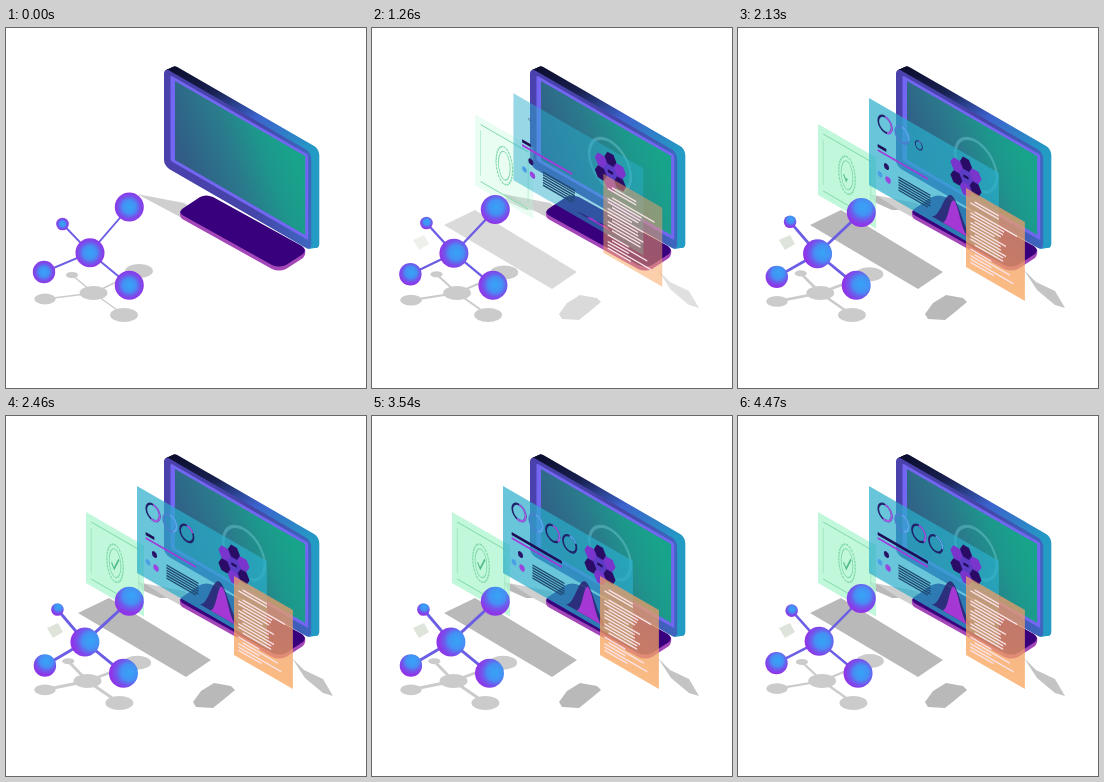
Recreate the animation shown at these times as an HTML page. Size 360x360 px, loop 4500 ms.

```html
<!DOCTYPE html>
<html lang="en">
<head>
<meta charset="utf-8">
<title>Isometric dashboard</title>
<style>
html, body { margin: 0; width: 100%; height: 100%; overflow: hidden; background: #fff; }
svg { display: block; width: 100vw; height: 100vh; }
</style>
</head>
<body>
<svg viewBox="0 0 360 360">
  <defs>
    <linearGradient id="body" x1="0" x2="1">
      <stop offset="0" stop-color="#0b0c2c"/><stop offset=".3" stop-color="#18204e"/>
      <stop offset=".6" stop-color="#3c62cc"/><stop offset="1" stop-color="#239cc4"/>
    </linearGradient>
    <linearGradient id="bezel" x1="0" x2="1">
      <stop offset="0" stop-color="#4b41ad"/><stop offset=".6" stop-color="#4544a8"/>
      <stop offset="1" stop-color="#3d67c0"/>
    </linearGradient>
    <linearGradient id="screen" x1="0" y1=".7" x2="1" y2=".4">
      <stop offset="0" stop-color="#315d86"/><stop offset=".45" stop-color="#2a7a8c"/>
      <stop offset=".75" stop-color="#1d978c"/><stop offset="1" stop-color="#18a38b"/>
    </linearGradient>
    <linearGradient id="paper" x1="0" y1="0" x2="0" y2="1">
      <stop offset="0" stop-color="#ea9c68"/><stop offset="1" stop-color="#f9a55c"/>
    </linearGradient>
    <radialGradient id="tone">
      <stop offset="0" stop-color="#36a4f6"/><stop offset=".45" stop-color="#4490f4"/>
      <stop offset=".72" stop-color="#7058ec"/><stop offset="1" stop-color="#8f35e8"/>
    </radialGradient>
    <radialGradient id="top" href="#tone"/>
    <radialGradient id="side" href="#tone"/>
  </defs>

  <path d="M131 166L178 175 276 242 262 237 176 190Z" fill="#cfcfcf"/>
  <g id="shades" fill="#b9b9b9">
    <path d="M72 197L103 182 205 244 180 261Z"/>
    <path d="M132 166L141 169 161 182 154 182 136 174Z"/>
    <path d="M187 286L195 275 208 267 225 270 229 274 217 284 207 292 190 291Z"/>
    <path d="M286 242L298 254 317 263 327 280 317 277 299 262Z" fill="#c4c4c4"/>
    <path d="M41 212L52 207 57 216 47 222Z" fill="#dfe4da"/>
  </g>

  <path d="M174 183Q173 190 178 192L266 241Q273 244 280 241L297 230Q300 227 299 221Z" fill="#a346b8"/>
  <path d="M176 181L194 169Q200 166 207 169L296 218Q301 222 297 226L280 237Q273 240 266 237L178 188Q172 185 176 181Z" fill="#38007c"/>
  <g id="shell"></g>
  <g transform="matrix(.866 .5 0 1 158 39.5)">
    <rect width="170" height="98.5" rx="6" fill="url(#bezel)"/>
    <rect x="7.5" y="4" width="159" height="85.5" rx="2" fill="#7366f2"/>
    <rect x="12.7" y="7.1" width="150.3" height="79" fill="url(#screen)"/>
    <circle id="ring" cx="92.4" cy="51.5" r="24" fill="none" stroke="#79cfdc" stroke-width="3"
      stroke-opacity=".4" pathLength="100" transform="rotate(-75 92.4 51.5)"/>
  </g>

  <g id="cert">
    <rect class="sheet" width="67" height="71" fill="#b2f6d1" fill-opacity=".8"/>
    <g class="ink" fill="none" stroke="#7fd9aa" stroke-width="1">
      <path d="M6 7H61M6 64H61"/>
      <path d="M6 13V58M61 13V58" stroke-opacity=".5"/>
      <ellipse cx="33.5" cy="34.5" rx="9.5" ry="18.5" stroke-width="1.4" stroke-dasharray="2.5 .8"/>
      <ellipse cx="33.5" cy="34.5" rx="6.8" ry="14"/>
      <path id="tick" d="M29.5 35.5L32.5 40.5 38 28.5" stroke="#55bd8d" stroke-width="1.6" pathLength="100"/>
    </g>
  </g>
  <g id="dash">
    <rect class="sheet" width="150" height="87" fill="#2aaecb" fill-opacity=".7"/>
    <g class="ink">
      <g id="rings"></g>
      <path id="bar" stroke="#1d0d55" stroke-width="3" fill="none"/>
      <path d="M10 47H68" stroke="#a03cdc" stroke-width="2.2"/>
      <circle cx="20.2" cy="58.4" r="3" fill="#2a1266"/>
      <circle cx="22" cy="71" r="3.2" fill="#9a45e0"/>
      <circle cx="12.7" cy="70" r="2.8" fill="#4a9fe6"/>
      <path d="M34 62H71M34 64.6H71M34 67.2H71M34 69.8H71M34 72.4H71M34 75H68" stroke="#1f4b72" stroke-width="1.6"/>
      <path id="hill" fill="#2b2372"/>
      <path id="peak" fill="#a538d4"/>
      <g id="cells"></g>
    </g>
  </g>
  <g id="note">
    <rect class="sheet" width="68" height="79" fill="url(#paper)" fill-opacity=".76"/>
    <g class="ink" id="rows" stroke="#fbe4ea" stroke-width="1.5"></g>
  </g>

  <g id="under" fill="#cbcbcb" stroke="#cbcbcb"></g>
  <g id="mol"></g>
</svg>
<script>
const LOOP = 4500;
const $ = id => document.getElementById(id);
const add = (parent, tag, attrs) => {
  const el = document.createElementNS("http://www.w3.org/2000/svg", tag);
  set(el, attrs);
  parent.appendChild(el);
  return el;
};
const set = (el, attrs) => { for (const k in attrs) el.setAttribute(k, attrs[k]); };
const span = (t, a, b) => Math.min(1, Math.max(0, (t - a) / (b - a)));
const ease = x => x * x * (3 - 2 * x);
const mix = (a, b, k) => a + (b - a) * k;

// Monitor depth
for (let i = 9; i > 0; i--) {
  add($("shell"), "rect", { width: 170, height: 98.5 + i * .3, rx: 6, fill: "url(#body)",
    transform: `matrix(.866 .5 0 1 ${158 + i * .9} ${39.5 - i * .4})` });
}

// Small gauges along the top of the dashboard
const gauges = [[0, 1150], [1, 1350], [2, 1900], [3, 2800]].map(([i, start]) => {
  const g = add($("rings"), "g", {});
  const base = { r: 7.8, fill: "none", "stroke-width": 2, pathLength: 100 };
  add(g, "circle", { ...base, stroke: i === 1 ? "#4a7fd0" : "#20216a" });
  const arc = add(g, "circle", { ...base, stroke: i % 2 ? "#58a8ec" : "#a05ae4", transform: "rotate(-90)" });
  return { g, arc, start, x: 18.5 + i * 19.5, y: 17.2 + i * .7, part: 55 - i * 9 };
});

// Honeycomb
const hexagon = (x, y, r) => "M" + [0, 1, 2, 3, 4, 5].map(i => {
  const a = i * Math.PI / 3;
  return (x + r * Math.cos(a)).toFixed(2) + " " + (y + r * Math.sin(a)).toFixed(2);
}).join("L") + "Z";
const hive = { x: 112, y: 23 };
add($("cells"), "circle", { cx: hive.x, cy: hive.y, r: 14, fill: "#5a3cc4" });
add($("cells"), "path", { d: `M${hive.x - 3} ${hive.y}h6`, stroke: "#200c58", "stroke-width": 2.6 });
for (let i = 0; i < 6; i++) {
  const a = (i + .5) * Math.PI / 3;
  add($("cells"), "path", {
    d: hexagon(hive.x + 12.8 * Math.cos(a), hive.y + 12.8 * Math.sin(a), 6.9),
    fill: i % 2 ? "#7a35cc" : "#2a0b66"
  });
}

// Lines of the note
let seed = 11;
const rand = () => (seed = seed * 16807 % 2147483647) / 2147483647;
const lines = [];
for (let i = 0; i < 20; i++) {
  if (i === 2 || i === 14) continue;
  const x = rand() < .3 ? 10 : 5;
  const len = i === 0 ? 28 : 24 + rand() * 29;
  lines.push(`M${x} ${(9 + i * 3.3).toFixed(1)}h${len.toFixed(1)}`);
}
add($("rows"), "path", { d: lines.join("") });

const sheets = [
  { id: "dash", x: 131, y: 70, dx: 28, dy: -13, a: 500, b: 1800 },
  { id: "cert", x: 80, y: 96, dx: 34, dy: -14, a: 850, b: 1950 },
  { id: "note", x: 228, y: 160, dx: 9, dy: -38, a: 500, b: 1800 }
].map(s => ({ ...s, el: $(s.id), fill: $(s.id).querySelector(".sheet"), ink: $(s.id).querySelector(".ink") }));

// Molecule: rest place, swung place, radius, shadow places, lit edge
const atoms = [
  { p: [84, 224.7], q: [78.5, 226], r: 14.5, s: [87.5, 265], e: [81, 265], lit: "side" },
  { p: [123.3, 179], q: [123.3, 185.8], r: 14.5, s: [133, 243], e: [131, 247], lit: "top" },
  { p: [56.5, 196], q: [51, 193.3], r: 6.3, s: [66, 247], e: [62, 245], lit: "top" },
  { p: [38, 244], q: [39, 250], r: 11.2, s: [39, 271], e: [39, 274], lit: "top" },
  { p: [123.3, 257.3], q: [117, 257.3], r: 14.5, s: [118, 287], e: [113, 287], lit: "side" }
];
atoms.forEach((a, i) => {
  if (!i) return;
  a.dark = add($("under"), "line", {});
  a.link = add($("mol"), "line", { stroke: "#6b5de4" });
});
atoms.forEach(a => {
  a.shade = add($("under"), "ellipse", { rx: a.r * .96, ry: a.r * .48, stroke: "none" });
  a.ball = add($("mol"), "circle", { r: a.r, fill: `url(#${a.lit})` });
});

function join(el, [x1, y1], [x2, y2], w) {
  set(el, { x1, y1, x2, y2, "stroke-width": w });
}

function draw(t) {
  const swing = (1 - Math.cos(t * Math.PI / 3000)) / 2;
  const at = (a, b) => a.map((v, i) => mix(v, b[i], swing));
  const hub = at(atoms[0].p, atoms[0].q), hubShade = at(atoms[0].s, atoms[0].e);
  atoms.forEach(a => {
    const c = at(a.p, a.q), s = at(a.s, a.e);
    set(a.ball, { cx: c[0], cy: c[1] });
    set(a.shade, { cx: s[0], cy: s[1] });
    if (a.link) {
      join(a.link, hub, c, mix(1.9, 3, swing));
      join(a.dark, hubShade, s, mix(1.5, 3, swing));
    }
  });
  const r = mix(.5, .64, swing);
  set($("top"), { cx: .5 + .08 * swing, cy: .5 - .22 * swing, r });
  set($("side"), { cx: .5 + .22 * swing, cy: .5 - .04 * swing, r });

  sheets.forEach(s => {
    const k = ease(span(t, s.a, s.b));
    set(s.el, { transform: `matrix(.866 .5 0 1 ${s.x + s.dx * (1 - k)} ${s.y + s.dy * (1 - k)})` });
    set(s.fill, { opacity: Math.min(1, k * 1.1) });
    set(s.ink, { opacity: Math.min(1, k * 4) });
  });
  set($("shades"), { opacity: ease(span(t, 800, 1700)) });

  const drawn = 100 * span(t, 250, 1000);
  set($("ring"), { "stroke-dasharray": `${drawn} 200`, opacity: drawn ? 1 : 0 });

  gauges.forEach(g => {
    const k = ease(span(t, g.start, g.start + 450));
    set(g.g, { transform: `translate(${g.x} ${g.y}) scale(${k})` });
    set(g.arc, { "stroke-dasharray": `${g.part * span(t, g.start, g.start + 1200)} 200` });
  });
  set($("bar"), { d: `M10 42.5H${mix(20, 68, ease(span(t, 2700, 3500)))}` });

  const up = ease(span(t, 1100, 2300));
  const hillTop = mix(82, 48, up), peakTop = mix(82, 52, up);
  set($("hill"), { d: `M72 82C82 80 87 ${hillTop} 95 ${hillTop}S108 74 120 82Z`, opacity: .85 });
  set($("peak"), { d: `M85 82C92 78 93 ${peakTop} 98 ${peakTop}S106 78 114 82Z` });

  const tick = 100 * span(t, 1900, 2400);
  set($("tick"), { "stroke-dasharray": `${tick} 200`, opacity: tick ? 1 : 0 });
}

const begin = performance.now();
function loop() {
  draw((performance.now() - begin) % LOOP);
  requestAnimationFrame(loop);
}
draw(0);
requestAnimationFrame(loop);
</script>
</body>
</html>
```
